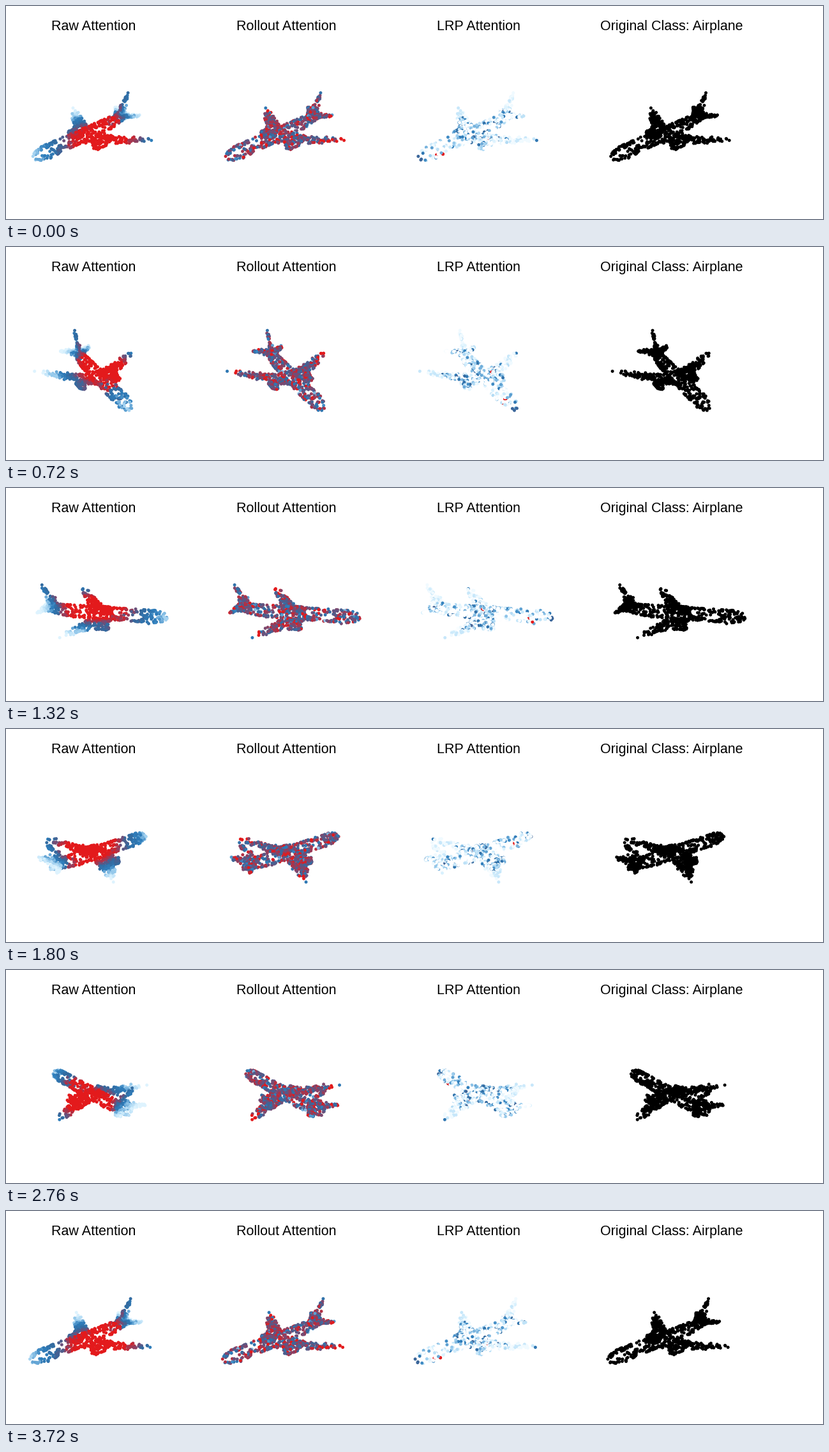
A matplotlib script for the animation above (3.84 s loop, 1280 px wide and 335 px high).

```python
import numpy as np
import matplotlib.pyplot as plt
from matplotlib.animation import FuncAnimation
from matplotlib.colors import LinearSegmentedColormap

W, H, DPI = 1280, 335, 100
FRAMES, INTERVAL = 32, 120
TURN = np.radians(356 / (FRAMES - 1))   # azimuth step per frame
ELEV = np.radians(27)
VIEW_DIST = 550
CENTER = (137.5, 195.5)
PANEL_STEP = 301.8
TITLES = ["Raw Attention", "Rollout Attention", "LRP Attention",
          "Original Class: Airplane"]

rng = np.random.default_rng(7)
heat = LinearSegmentedColormap.from_list("heat", [
    (0, "#ffffff"), (.07, "#d8f1fe"), (.24, "#9bcdee"), (.45, "#2e7ebc"),
    (.6, "#336a9f"), (.8, "#84456a"), (1, "#e31a1c")])


def lerp(a, b, t):
    return a + (b - a) * t


def fuselage(n):
    along = rng.uniform(-80, 113, n)
    around = rng.uniform(0, 2 * np.pi, n)
    nose = np.sqrt(np.clip(1 - ((along - 90) / 24) ** 2, 0, 1))
    radius = np.where(along > 90, 9.6 * nose,
                      np.interp(along, [-85, -35], [5, 9.6]))
    lift = np.interp(along, [-85, -35], [4, 0])
    return np.column_stack([along, radius * np.cos(around),
                            radius * np.sin(around) + lift])


def panel_points(n, lead, trail, span, taper):
    """Points on a tapered blade: distance along body and out along the span."""
    t = 1 - (1 - rng.uniform(0, 1, n)) ** taper
    along = lerp(lerp(*lead, t), lerp(*trail, t), rng.uniform(0, 1, n))
    return along, lerp(*span, t), t


def wing(n, side):
    along, out, t = panel_points(n, (33, -27), (-5, -36), (7, 86), .55)
    tip = [[-33, side * 86, 2.5]]
    blade = np.column_stack([along, side * out,
                             -7 + 9 * t + rng.normal(0, 1.2, n)])
    return np.vstack([blade, tip])


def stabilizer(n, side):
    along, out, _ = panel_points(n, (-52, -80), (-76, -86), (2, 28), .75)
    return np.column_stack([along, side * out, 6.5 + rng.normal(0, 1, n)])


def fin(n):
    along, up, _ = panel_points(n, (-48, -82), (-72, -86), (6, 42), .6)
    return np.vstack([np.column_stack([along, rng.normal(0, .9, n), up]),
                      [[-84, 0, 43]]])


def engine(n, side):
    around = rng.uniform(0, 2 * np.pi, n)
    return np.column_stack([rng.uniform(6, 28, n),
                            side * 29 + 5 * np.cos(around),
                            -8 + 4.5 * np.sin(around)])


cloud = np.vstack([fuselage(300), wing(135, -1), wing(135, 1),
                   stabilizer(52, -1), stabilizer(52, 1), fin(48),
                   engine(42, -1), engine(42, 1), [[85, 0, -13]]])
along, side, up = cloud.T
count = len(cloud)


def raw_scores():
    ahead = along + 8
    dist = np.hypot(np.where(ahead > 0, .75, 1) * ahead, 1.15 * (side - 22))
    dist += 1.1 * np.clip(-50 - along, 0, None)
    dist -= 1.3 * np.clip(up - 8, 0, None)
    dist += rng.normal(0, 2.5, count)
    return np.interp(dist, [42, 54, 66, 82, 94, 112],
                     [1, .8, .6, .45, .25, .06])


def rollout_scores():
    scores = np.clip(rng.normal(.74, .17, count), .25, 1)
    wingtip = (np.abs(side) > 62) & (rng.random(count) < .45)
    scores[wingtip] = 1
    return scores


def lrp_scores():
    scores = .65 * rng.random(count) ** 5
    tips = (np.abs(side) > 55) | ((along < -60) & (up > 14))
    scores[tips] = np.clip(scores[tips], .03, .12)

    def spot(point, size, value):
        gap = np.linalg.norm(cloud - point, axis=1)
        scores[np.argsort(gap)[:size]] = value

    spot((79, 0, -8), 3, 1)
    spot((1, 21, -6), 2, 1)
    spot((110, 0, -4), 3, .62)
    spot((-33, 86, 2), 1, .5)
    return scores


colors = [heat(raw_scores()), heat(rollout_scores()), heat(lrp_scores()),
          np.tile([0, 0, 0, 1.0], (count, 1))]

# The body lies diagonally on the ground plane.
ground_x = (side - along) / np.sqrt(2)
ground_y = (side + along) / np.sqrt(2)


def project(angle):
    across = ground_x * np.cos(angle) + ground_y * np.sin(angle)
    depth = ground_y * np.cos(angle) - ground_x * np.sin(angle)
    scale = 1 / (1 - depth / VIEW_DIST)
    x = CENTER[0] + scale * across
    y = CENTER[1] + scale * (depth * np.sin(ELEV) - up * np.cos(ELEV))
    return np.column_stack([x, y]), np.argsort(depth)


fig = plt.figure(figsize=(W / DPI, H / DPI), dpi=DPI, facecolor="white")
ax = fig.add_axes([0, 0, 1, 1])
ax.set(xlim=(0, W), ylim=(H, 0))
ax.axis("off")

dots = []
for i, title in enumerate(TITLES):
    ax.text(137 + PANEL_STEP * i, 38, title, ha="center", va="baseline",
            family="Liberation Sans", fontsize=15.5, color="black")
    dots.append(ax.scatter(np.zeros(count), np.zeros(count),
                           s=(5 * 72 / DPI) ** 2, linewidths=0))


def update(frame):
    points, order = project(frame * TURN)
    for i, (dot, color) in enumerate(zip(dots, colors)):
        dot.set_offsets(points[order] + [PANEL_STEP * i, 0])
        dot.set_facecolors(color[order])
    return dots


anim = FuncAnimation(fig, update, frames=FRAMES, interval=INTERVAL,
                     repeat=True, repeat_delay=0)
plt.show()
```
